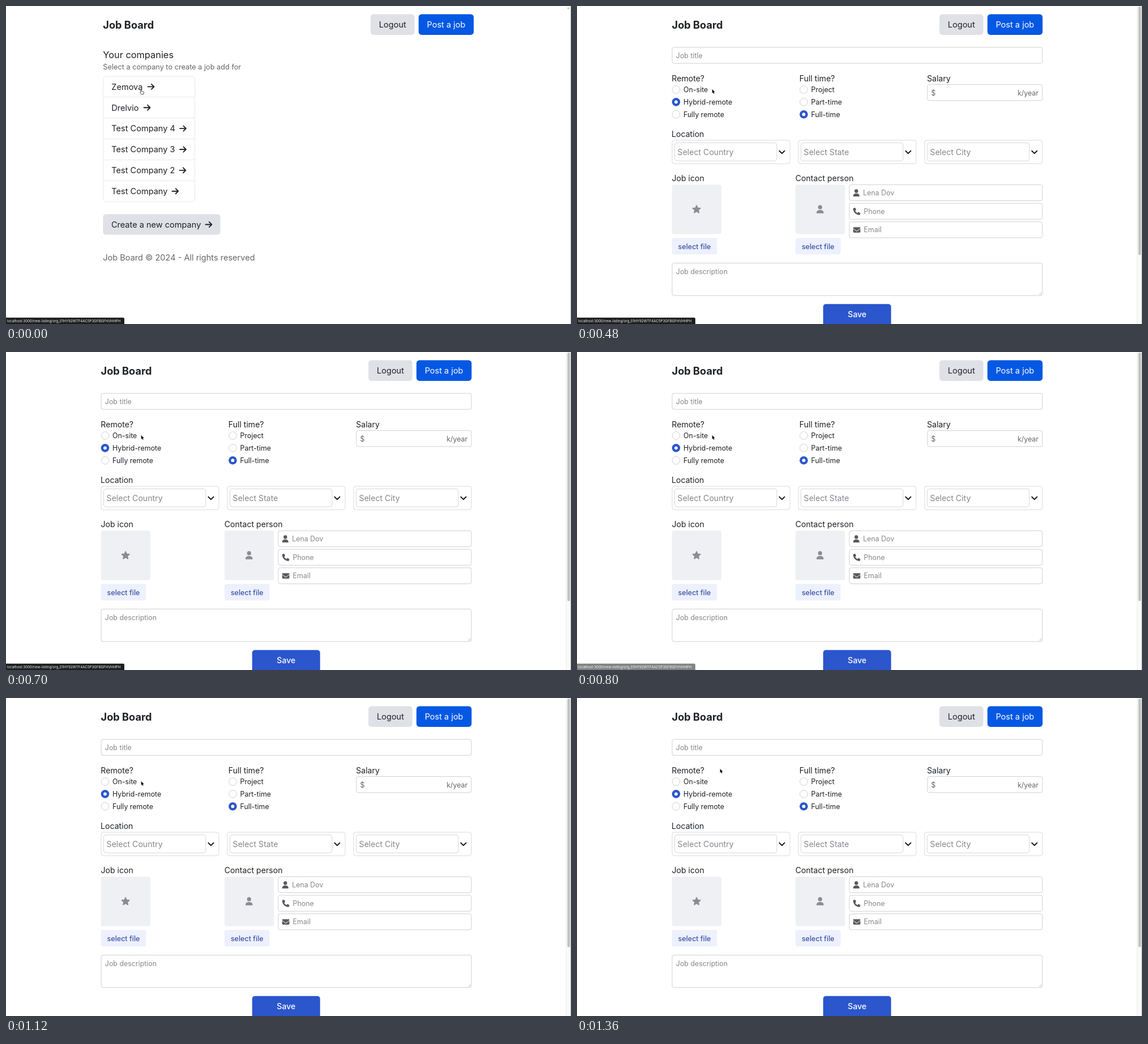
Recreate the animation shown at these times as an HTML page. Size 998 px wide and 561 px high, loop 1440 ms.

```html
<!DOCTYPE html>
<html lang="en">
<head>
<meta charset="utf-8">
<title>Job board</title>
<style>
  html, body { margin: 0; width: 100%; height: 100%; overflow: hidden; background: #fff; }
  svg { display: block; width: 100%; height: 100%; font-family: Inter, "Liberation Sans", sans-serif; }
  text { white-space: pre; }
</style>
</head>
<body>
<svg id="stage" viewBox="0 0 998 561"></svg>
<script>
const LOOP = 1440;
const INK = '#1f2125', MUTED = '#646669', HINT = '#85878b', LINE = '#cfd0d4';
const GREY = '#e0e1e6', BLUE = '#0558e3', INDIGO = '#2b56cc';
const REM = 14.56, LABEL = 14.1, SMALL = 12.42;

// Text is placed by the middle of its capitals.
const text = (x, mid, size, str, fill = INK, weight = 400, anchor = 'start') =>
  `<text x="${x}" y="${mid + size * 0.364}" font-size="${size}" fill="${fill}" font-weight="${weight}" text-anchor="${anchor}">${str}</text>`;

const box = (x1, y1, x2, y2, fill, r = 4, stroke = 'none') =>
  `<rect x="${x1}" y="${y1}" width="${x2 - x1}" height="${y2 - y1}" rx="${r}" fill="${fill}" stroke="${stroke}"/>`;

const field = (x1, y1, x2, y2, color = LINE, r = 3.5) => box(x1, y1, x2, y2, '#fff', r, color);

const line = (d, color, width) =>
  `<path d="${d}" fill="none" stroke="${color}" stroke-width="${width}" stroke-linecap="round" stroke-linejoin="round"/>`;

const arrow = (x, y) => line(`M${x + 0.9} ${y}h10.9m-4.55 -4.55l4.55 4.55l-4.55 4.55`, INK, 1.85);
const chevron = (x, y) => line(`M${x - 4.55} ${y - 2.2}l4.55 4.55l4.55 -4.55`, '#111', 2);

const icons = {
  user: 'M224 256A128 128 0 1 0 224 0a128 128 0 1 0 0 256zm-45.7 48C79.8 304 0 383.8 0 482.3 0 498.7 13.3 512 29.7 512h388.6c16.4 0 29.7-13.3 29.7-29.7C448 383.8 368.2 304 269.7 304z',
  phone: 'M165 25c-8-19-28-29-47-24l-88 24C12 30 0 46 0 64 0 311 201 512 448 512c18 0 34-12 39-30l24-88c5-19-5-39-24-47l-96-40c-16-7-35-2-46 12l-40 49C234 335 177 278 144 207l49-40c14-11 18-30 12-46z',
  mail: 'M48 64C21 64 0 85 0 112c0 15 7 29 19 38l218 164c11 8 27 8 38 0l218-164c12-9 19-23 19-38 0-27-21-48-48-48zM0 176v208c0 35 29 64 64 64h384c35 0 64-29 64-64V176L294 339c-23 17-54 17-77 0z'
};
const icon = (name, x, y, size, fill) =>
  `<path transform="translate(${x} ${y}) scale(${size / 512})" d="${icons[name]}" fill="${fill}"/>`;

function star(cx, cy, r, fill) {
  const pts = Array.from({ length: 10 }, (_, i) => {
    const a = (i / 5 - 0.5) * Math.PI, d = i % 2 ? r * 0.48 : r;
    return `${(cx + d * Math.cos(a)).toFixed(2)},${(cy + d * Math.sin(a)).toFixed(2)}`;
  });
  return `<polygon points="${pts.join(' ')}" fill="${fill}" stroke="${fill}" stroke-width="1.4" stroke-linejoin="round"/>`;
}

function radio(x, y, label, on) {
  const dot = on
    ? `<circle cx="${x}" cy="${y}" r="7.3" fill="${INDIGO}"/><circle cx="${x}" cy="${y}" r="2.9" fill="#fff"/>`
    : `<circle cx="${x}" cy="${y}" r="6.8" fill="#fff" stroke="${LINE}"/>`;
  return dot + text(x + 13.1, y + 0.3, SMALL, label);
}

const radios = (x, title, labels, chosen) =>
  text(x - 7.7, 127.6, LABEL, title) +
  labels.map((s, i) => radio(x, 147.5 + i * 21.85, s, i === chosen)).join('');

const header = () =>
  text(171.3, 33, 18.2, 'Job Board', INK, 700) +
  box(644, 14.5, 721.6, 50.9, GREY, 5.4) + text(682.8, 32.8, REM, 'Logout', INK, 400, 'middle') +
  box(728.8, 14.5, 826.2, 50.9, BLUE, 5.4) + text(777.4, 32.8, REM, 'Post a job', '#fff', 400, 'middle');

function listPage() {
  const pitch = 36.86;
  const rows = [
    ['Zemova', 249.7], ['Drelvio', 242.7], ['Test Company 4', 306.2],
    ['Test Company 3', 306.2], ['Test Company 2', 305.6], ['Test Company', 292.5]
  ];
  const list = rows.map(([name, x], i) => {
    const y = 142.4 + i * pitch;
    const rule = i ? `<path d="M172 ${Math.floor(124 + i * pitch) + 0.5}H333.5" stroke="#e8e9ec"/>` : '';
    return rule + text(186.3, y, REM, name) + arrow(x, y);
  }).join('');
  return header() +
    text(171.3, 85.7, 16.38, 'Your companies') +
    text(171.3, 107.2, 12.74, 'Select a company to create a job add for', MUTED) +
    field(171.7, 124, 333.6, 345.4, '#e8e9ec', 5.4) + list +
    box(171.3, 367.2, 378.7, 403.6, GREY, 5.4) +
    text(185.9, 385.5, REM, 'Create a new company') + arrow(351.6, 385.5) +
    text(171.3, 443.6, REM, 'Job Board © 2024 - All rights reserved', MUTED) +
    '<circle cx="993.3" cy="4" r="1.8" fill="#c4c4c4"/>';
}

const picker = (x, label) =>
  field(x, 236.8, x + 208, 278.2, '#d9dade', 4) + field(x + 4.5, 241.4, x + 184.9, 273.2, '#d6d7da', 4) +
  text(x + 9.6, 257.9, LABEL, label, HINT) + chevron(x + 194, 257.8);

const upload = (x, label, mark) =>
  text(x, 304.2, LABEL, label) + box(x + 0.2, 315.2, x + 87.5, 402.4, '#eff0f3', 3.6) + mark +
  box(x + 0.2, 409.2, x + 79.8, 438.3, '#edf0fd', 3.6) +
  text(x + 40, 424.7, 12.5, 'select file', '#3b53a4', 500, 'middle');

const contact = (y, name, x, label) =>
  field(481, y, 822, y + 28.2) + icon(name, 487.8, y + 8, 12.74, '#58595e') +
  text(x, y + 14.1, SMALL, label, HINT);

const formPage = () =>
  `<g transform="translate(-3.8 0)">${header()}</g>` +
  field(168, 73, 822, 101.2) + text(174.8, 87.1, SMALL, 'Job title', HINT) +
  radios(175, 'Remote?', ['On-site', 'Hybrid-remote', 'Fully remote'], 1) +
  radios(400.5, 'Full time?', ['Project', 'Part-time', 'Full-time'], 2) +
  text(618.2, 127.6, LABEL, 'Salary') + field(619, 138.6, 822, 166.8) +
  text(625.6, 153, SMALL, '$', MUTED) + text(815.2, 153, SMALL, 'k/year', MUTED, 400, 'end') +
  text(167.1, 225.8, LABEL, 'Location') +
  picker(168, 'Select Country') + picker(391, 'Select State') + picker(614, 'Select City') +
  upload(167.5, 'Job icon', star(211.2, 359, 7.2, '#8b8c91')) +
  upload(385.8, 'Contact person', icon('user', 423, 351.3, 14.56, '#8b8c91')) +
  contact(315.3, 'user', 505.3, 'Lena Dov') +
  contact(348, 'phone', 506.6, 'Phone') +
  contact(380.7, 'mail', 506.6, 'Email') +
  field(168, 453.5, 822, 510.8) + text(174.8, 468.4, SMALL, 'Job description', HINT) +
  line('M816.5 509l4 -4M819 509.3l1.6 -1.6', '#9a9a9a', 0.6) +
  box(434.8, 525.8, 554.8, 566, INDIGO, 5) + text(494.8, 544.2, LABEL, 'Save', '#fff', 500, 'middle') +
  box(989.5, 0, 997, 561, '#fafafa', 0) + '<path d="M989.5 0V561" stroke="#ececec"/>' +
  box(991.6, 1, 996.2, 439.5, '#c1c1c1', 2.3);

const status = () =>
  '<path d="M0 549.8H207a2 2 0 0 1 2 2V561H0Z" fill="#1d1f1e"/>' +
  text(2, 555.6, 6.2, 'localhost:3000/new-listing/org_01HY92WTF4AC5P3GFBGFHVHHPH', '#f1f1f1');

const hand = '<path transform="translate(236 146.2)" d="M1.9 1.2Q2.6 .2 3.2 1.2V4L6.6 4.7Q7.7 5 7.5 6.2L6.8 9.6H3L.7 6.8Q.3 5.6 1.9 6.2Z" fill="#fff" stroke="#333" stroke-width=".9" stroke-linejoin="round"/>';
const pointer = '<path d="M0 0V7L1.6 5.6L2.7 8.1L4 7.5L2.9 5.1H5Z" fill="#111" stroke="#fff" stroke-width=".9" stroke-linejoin="round" paint-order="stroke"/>';

const group = (id, body) => `<g id="${id}">${body}</g>`;
document.getElementById('stage').innerHTML =
  group('list', listPage() + hand) + group('form', formPage()) + group('status', status()) +
  group('pointer', pointer) + '<path d="M997.5 0V561" stroke="#bdbdbd"/>';

const [list, form, bar, mouse] = ['list', 'form', 'status', 'pointer'].map(id => document.getElementById(id));
const show = (el, on) => el.setAttribute('display', on ? 'inline' : 'none');

function draw(t) {
  const opened = t >= 480;
  show(list, !opened);
  show(form, opened);
  show(mouse, opened);
  show(bar, t < 880);
  bar.setAttribute('opacity', t < 800 ? 1 : 0.55);
  mouse.setAttribute('transform', t < 1360 ? 'translate(238.7 146.8)' : 'translate(252.7 124.9)');
}

const start = performance.now();
function tick() {
  draw((performance.now() - start) % LOOP);
  requestAnimationFrame(tick);
}
tick();
</script>
</body>
</html>
```
